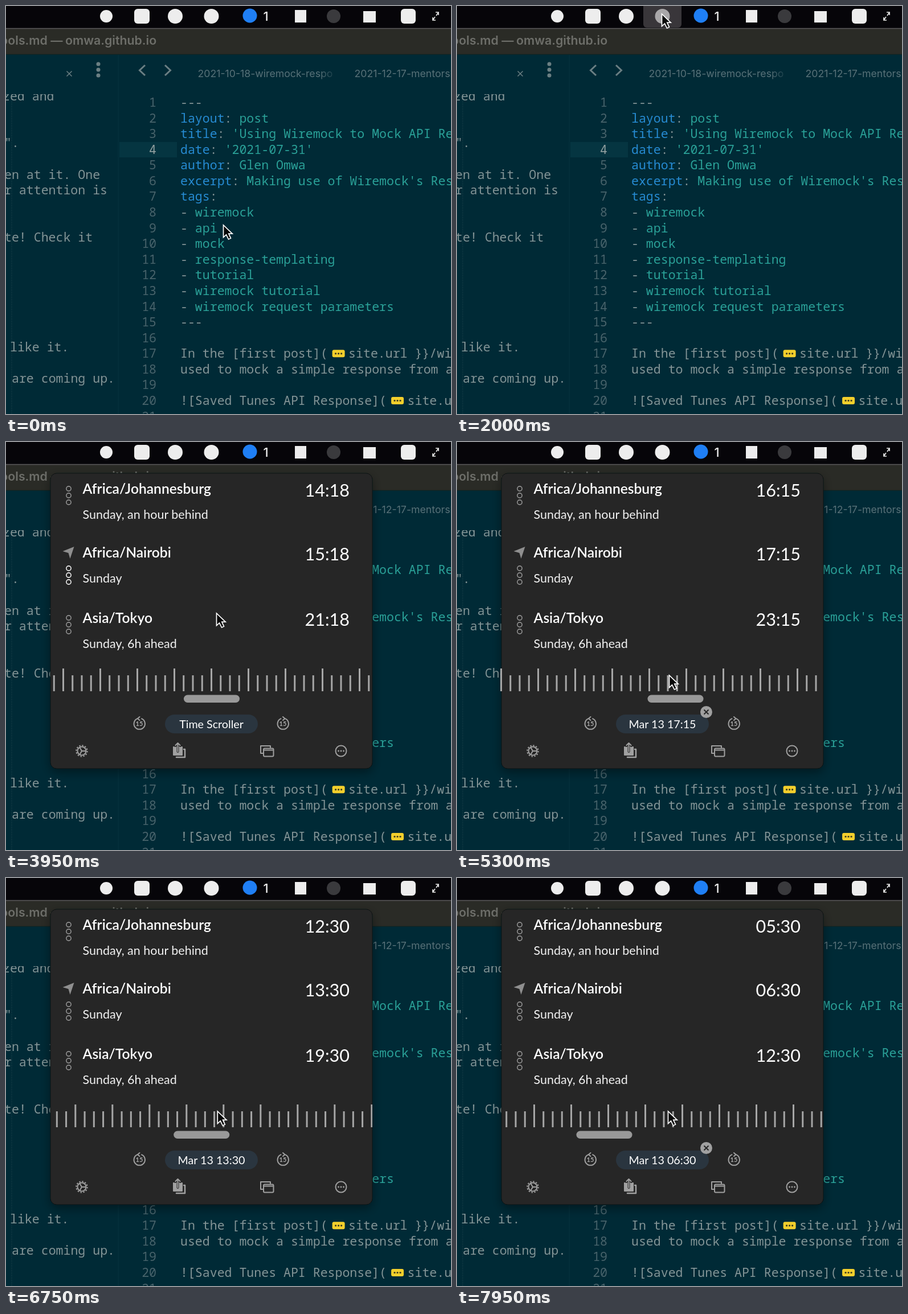
Recreate the animation shown at these times as an HTML page. Size 781 by 717 pixels, loop 8000 ms.

```html
<!DOCTYPE html>
<html lang="en">
<head>
<meta charset="utf-8">
<title>Time scroller</title>
<style>
html, body { margin: 0; width: 100%; height: 100%; overflow: hidden; background: #002a36; }
svg { display: block; width: 100%; height: 100%; }
text { white-space: pre; }
.code { font: 21.55px "Noto Sans Mono", monospace; fill: #839496; }
.key { fill: #268bd2; }
.val { fill: #2aa198; }
.num { fill: #48636b; text-anchor: end; }
.num.on { fill: #93a1a1; }
.ui { font-family: Inter, sans-serif; }
.title { font-size: 21.3px; font-weight: 600; fill: #6d6e69; }
.tab { font-size: 17.7px; fill: #587178; }
.panel { font-family: Lato, sans-serif; fill: #fff; }
.name { font-size: 24.6px; font-weight: 600; }
.sub { font-size: 21.5px; fill: #f2f2f2; }
.time { font-size: 30.5px; text-anchor: end; }
.label { font-size: 19.7px; text-anchor: middle; }
.line { fill: none; stroke: #a0a0a0; stroke-width: 2; stroke-linecap: round; stroke-linejoin: round; }
.small { font-size: 11px; font-weight: 700; fill: #a8a8a8; text-anchor: middle; }
</style>
</head>
<body>
<svg viewBox="0 0 781 717" preserveAspectRatio="none">
  <defs>
    <clipPath id="pane"><rect y="155" width="781" height="562"/></clipPath>
    <clipPath id="ruler"><rect x="76" y="390" width="567" height="52"/></clipPath>
    <filter id="shadow" x="-10%" y="-10%" width="120%" height="125%">
      <feDropShadow dx="0" dy="6" stdDeviation="9" flood-color="#000" flood-opacity=".4"/>
    </filter>
    <linearGradient id="fade">
      <stop stop-color="#002a36" stop-opacity="0"/><stop offset="1" stop-color="#002a36"/>
    </linearGradient>
  </defs>

  <rect width="781" height="717" fill="#002a36"/>
  <g id="editor" clip-path="url(#pane)">
    <rect x="199" y="239" width="101" height="27" fill="#053541"/>
    <path d="M10 155V717" stroke="#2b4c55" stroke-dasharray="1 2"/>
  </g>
  <path d="M197 86V717" stroke="#06323e"/>

  <g fill="none" stroke="#6b7f83">
    <path d="M106.500 114.500l9 9m0-9l-9 9" stroke-width="1.500"/>
    <path d="M244 104l-9.500 9 9.500 9M279 104l9.500 9-9.500 9" stroke-width="3"/>
  </g>
  <g fill="#6b7f83">
    <circle cx="162" cy="102" r="3.500"/><circle cx="162" cy="112" r="3.500"/><circle cx="162" cy="122" r="3.500"/>
  </g>
  <g class="ui tab">
    <text x="336.500" y="125">2021-10-18-wiremock-respo</text>
    <rect x="550" y="105" width="34" height="28" fill="url(#fade)"/>
    <rect x="584" y="105" width="20" height="28" fill="#002a36"/>
    <text x="611.500" y="125">2021-12-17-mentorship</text>
  </g>

  <rect y="40" width="781" height="45" fill="#2a2b26"/>
  <path d="M0 85H781" stroke="#13201f"/>
  <g class="ui title">
    <text x="99.500" y="68" text-anchor="end">tools.md —</text>
    <text x="104" y="68">omwa.github.io</text>
  </g>

  <rect width="781" height="39" fill="#060509"/>
  <path d="M0 39.500H781" stroke="#5b5a5c" stroke-width="1.500"/>
  <rect id="pressed" x="327" y="-6" width="67" height="44" rx="6" fill="#39363a"/>
  <g fill="#ededed">
    <circle cx="176" cy="18" r="11"/>
    <rect x="225" y="5" width="27" height="26" rx="6"/>
    <circle cx="297" cy="18" r="13"/>
    <circle id="clock" cx="360.500" cy="18" r="13"/>
    <circle cx="428" cy="17" r="12.500" fill="#1f7ff5"/>
    <rect x="507" y="7" width="20" height="22"/>
    <circle cx="575" cy="18" r="12" fill="#3a3a3d"/>
    <rect x="627" y="9" width="22" height="20"/>
    <rect x="693" y="5" width="26" height="26" rx="6"/>
    <text class="ui" x="451.500" y="25.500" font-size="22" font-weight="500">1</text>
  </g>
  <path d="M755 17l4-6m-5 0h5v5M753 19l-4 6m5 0h-5v-5" fill="none" stroke="#e8e8e8" stroke-width="1.700"/>

  <g id="popover" class="panel">
    <rect x="78" y="55" width="565" height="519" rx="11" fill="#282828" stroke="#0d1212" filter="url(#shadow)"/>
    <path d="M99.500 192L119.500 184 112.500 205 109.500 195z" fill="#8f8f8f"/>
    <g clip-path="url(#ruler)"><g id="ticks"></g></g>
    <rect id="thumb" y="444.500" width="98" height="13.500" rx="6.700" fill="#999"/>
    <rect x="279" y="479" width="163" height="33" rx="16.500" fill="#2a353f"/>
    <text id="label" class="label" x="360.500" y="503"></text>
    <g id="reset">
      <circle cx="437.500" cy="474.500" r="10.500" fill="#a0a0a0"/>
      <path d="M433.500 470.500l8 8m0-8l-8 8" stroke="#262626" stroke-width="2"/>
    </g>
    <g class="line" stroke-width="1.800">
      <path d="M230.500 486.200A9.700 9.700 0 1 0 238 486.200M234.500 483l-3.500 3 3.500 3"/>
      <path d="M482.500 486.200A9.700 9.700 0 1 0 490 486.200M486 483l3.500 3-3.500 3"/>
      <circle cx="133" cy="543" r="7.500"/>
      <circle cx="133" cy="543" r="9.700" stroke-dasharray="2.500 2.580" stroke-linecap="butt"/>
      <path d="M133 543h7M133 543l-3.500-6M133 543l-3.500 6"/>
      <path d="M298 536h-4v14h15v-14h-4z" fill="#a0a0a0"/>
      <path d="M312 540h2v14h-15" stroke-width="2.500"/>
      <path d="M301.500 544V531M297 534l4.500-5 4.500 5" stroke="#282828" stroke-width="4"/>
      <path d="M301.500 544V530M297.500 533l4-4 4 4"/>
      <path d="M451 547h-4v-13h17v3"/>
      <rect x="452" y="538.500" width="17.500" height="14" rx="2"/>
      <path d="M453 541.500h15"/>
      <circle cx="588" cy="543" r="9.500"/>
      <path d="M583.500 543h.01M588 543h.01M592.500 543h.01" stroke-width="2.800"/>
    </g>
    <text class="small" x="234" y="499">15</text>
    <text class="small" x="486" y="499">15</text>
  </g>

  <g id="cursor">
    <path d="M1.500 2V23.500L6.500 18.800l4 8.200 4-1.800-3.700-8H17.200z" fill="#080808" stroke="#fff" stroke-width="1.700"/>
  </g>
</svg>
<script>
const LOOP = 8000;
const CHAR = 12.93, LINE = 27.58, TOP = 177;
const $ = id => document.getElementById(id);

function add(parent, tag, attrs, content) {
  const el = document.createElementNS("http://www.w3.org/2000/svg", tag);
  for (const name in attrs) el.setAttribute(name, attrs[name]);
  if (content) el.textContent = content;
  parent.append(el);
  return el;
}

// Editor text: "key|value" lines, "- tag" lines and plain prose with ~ for a folded span.
const lines = [
  "---", "layout|post", "title|'Using Wiremock to Mock API Responses'", "date|'2021-07-31'",
  "author|Glen Omwa", "excerpt|Making use of Wiremock's Response", "tags|",
  "- wiremock", "- api", "- mock", "- response-templating", "- tutorial",
  "- wiremock tutorial", "- wiremock request parameters", "---", "",
  "In the [first post](~site.url }}/wire", "used to mock a simple response from an",
  "", "![Saved Tunes API Response](~site.url", ""
];
const code = (x, y, content, cls = "") => content && add($("editor"), "text", { x, y, class: "code " + cls }, content);

function fold(x, y) {
  add($("editor"), "rect", { x, y: y - 14, width: 22, height: 13, rx: 3, fill: "#f3cf2c" });
  for (const dx of [6, 11, 16]) add($("editor"), "circle", { cx: x + dx, cy: y - 7.5, r: 1.6, fill: "#3b3a20" });
}

lines.forEach((line, i) => {
  const y = TOP + i * LINE, x = 306;
  code(264, y, String(i + 1), i === 3 ? "num on" : "num");
  if (line.includes("|")) {
    const [key, value] = line.split("|");
    code(x, y, key, "key");
    code(x + key.length * CHAR, y, ":");
    code(x + (key.length + 2) * CHAR, y, value, "val");
  } else if (line.startsWith("- ")) {
    code(x, y, "-");
    code(x + 2 * CHAR, y, line.slice(2), "val");
  } else if (line.includes("~")) {
    const [before, after] = line.split("~"), end = x + before.length * CHAR;
    code(x, y, before);
    fold(end + 8, y);
    code(end + 36.5, y, after);
  } else code(x, y, line);
});

[[-6, 166, "zed and"], [-3, 248, "\"."], [-3, 304, "en at it. One"], [-3, 331, "r attention is"],
 [-3, 414, "te! Check it"], [7, 607, "like it."], [10, 662, "are coming up."]
].forEach(row => code(...row));

// World clock rows: offset is in hours from the local zone.
const rows = [
  { name: "Africa/Johannesburg", y: 91, dots: 82, offset: -1, note: ", an hour behind", from: 55 },
  { name: "Africa/Nairobi", y: 203, dots: 222, offset: 0, note: "", from: 165 },
  { name: "Asia/Tokyo", y: 318, dots: 309, offset: 6, note: ", 6h ahead", from: 300 }
];
for (const row of rows) {
  const panel = $("popover");
  add(panel, "text", { x: 134.5, y: row.y, class: "name" }, row.name);
  row.sub = add(panel, "text", { x: 134.5, y: row.y + 43.5, class: "sub" });
  row.time = add(panel, "text", { x: 603, y: row.y + 4.5, class: "time" });
  row.grip = add(panel, "g", { fill: "none", "stroke-width": 1.6 });
  for (let i = 0; i < 3; i++) add(row.grip, "circle", { cx: 110, cy: row.dots + i * 12, r: 4.1 });
}

const HOUR = 65;
for (let i = -24; i < 24; i++) {
  const tall = i % 4 === 0;
  add($("ticks"), "rect", {
    x: 359 + i * HOUR / 4, y: tall ? 398 : 410, width: 3, height: tall ? 40 : 28,
    fill: "#a6a6a6"
  });
}

const smooth = p => p * p * (3 - 2 * p);
const swipe = p => 1 - (1 - p) ** 2;

function sample(keys, t, ease) {
  const i = keys.findIndex(key => key[0] > t);
  if (i < 0) return keys[keys.length - 1].slice(1);
  const a = keys[i - 1], b = keys[i], p = ease((t - a[0]) / (b[0] - a[0]));
  return a.slice(1).map((v, j) => v + (b[j + 1] - v) * p);
}

// time, x, y
const pointer = [
  [0, 380, 383], [250, 380, 383], [1600, 358, 12], [2450, 358, 12], [3500, 368, 299],
  [4250, 368, 299], [4550, 371, 408], [6400, 371, 408], [7000, 369, 408]
];
// time, thumb x, ruler shift, local hour
const NOW = 15.3;
const scroll = [
  [0, 312, 0, NOW], [4850, 312, 0, NOW], [5250, 334.5, -153, 17.3], [5650, 334.5, -153, 17.3],
  [6150, 347, -227, 18.3], [6400, 347, -227, 18.3], [7300, 263, 272, 11.05], [7950, 209.5, 555, 6.55]
];

const pad = n => String(n).padStart(2, "0");
function clock(hour) {
  const minutes = Math.round(hour * 60), wrapped = (minutes + 1440) % 1440;
  return pad(Math.floor(wrapped / 60)) + ":" + pad(wrapped % 60);
}
const show = (el, on) => el.setAttribute("opacity", +on);

function draw(t) {
  const [x, y] = sample(pointer, t, smooth);
  const [thumb, shift, rawHour] = sample(scroll, t, swipe);
  const idle = t <= 4850;
  const hour = idle ? NOW : Math.floor(rawHour * 4) / 4;
  const pressed = t >= 1900 && t < 2150;

  $("cursor").setAttribute("transform", `translate(${x} ${y})`);
  show($("pressed"), pressed);
  $("clock").setAttribute("fill", pressed ? "#a9a7a9" : "#ededed");
  show($("popover"), Math.min(1, Math.max(0, (t - 2050) / 150)));

  $("thumb").setAttribute("x", thumb);
  $("ticks").setAttribute("transform", `translate(${shift % HOUR})`);
  $("label").textContent = idle ? "Time Scroller" : "Mar 13 " + clock(hour);
  show($("reset"), t >= 5000 && (t < 6650 || t >= 7500));

  rows.forEach((row, i) => {
    const next = rows[i + 1] ? rows[i + 1].from : 390;
    const local = hour + row.offset;
    row.time.textContent = clock(local);
    row.sub.textContent = (local >= 24 ? "Monday" : "Sunday") + row.note;
    row.grip.setAttribute("stroke", y >= row.from && y < next ? "#f0f0f0" : "#929292");
  });
}

const start = performance.now();
function tick() {
  draw((performance.now() - start) % LOOP);
  requestAnimationFrame(tick);
}
tick();
</script>
</body>
</html>
```
